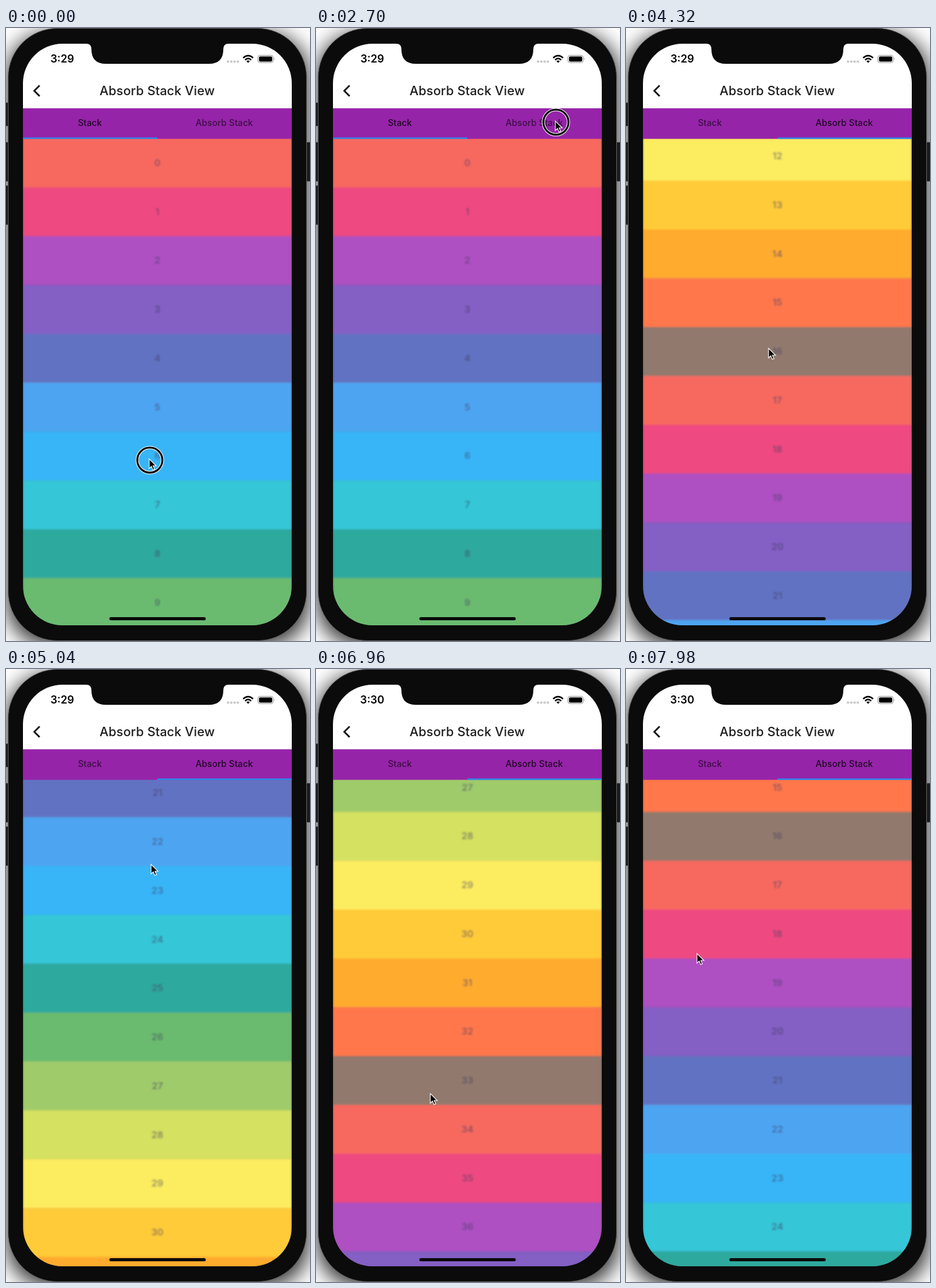
Write an HTML page that moves like this. It is 484 px wide and 976 px high and loops after 8 s.

```html
<!DOCTYPE html>
<html lang="en">
<head>
<meta charset="utf-8">
<title>Absorb Stack View</title>
<style>
  html, body { margin: 0; width: 100%; height: 100%; overflow: hidden; background: #fff; }
  svg { display: block; width: 100vw; height: 100vh; }
  text { font-family: Inter, Roboto, sans-serif; text-anchor: middle; }
</style>
</head>
<body>
<svg id="stage" viewBox="0 0 484 976" preserveAspectRatio="none">
  <defs>
    <filter id="soft" filterUnits="userSpaceOnUse" x="-480" y="80" width="1440" height="970">
      <feGaussianBlur stdDeviation="1.7"/>
    </filter>
    <filter id="shade" x="-20%" y="-10%" width="140%" height="120%">
      <feGaussianBlur stdDeviation="16"/>
    </filter>
    <clipPath id="screen"><rect x="27" y="25" width="428" height="926" rx="63"/></clipPath>
    <clipPath id="list"><rect x="27" y="176" width="428" height="775"/></clipPath>
  </defs>

  <rect width="484" height="976" fill="#fff"/>
  <rect x="1" y="8" width="482" height="976" rx="70" opacity=".8" filter="url(#shade)"/>
  <g fill="#1b1b1b" stroke="#444" stroke-width=".6">
    <rect x="-2" y="119" width="7" height="37" rx="2"/>
    <rect x="-2" y="182" width="7" height="62" rx="2"/>
    <rect x="-2" y="251" width="7" height="62" rx="2"/>
    <rect x="478" y="182" width="8" height="62" rx="2"/>
  </g>
  <rect x="3.5" y=".5" width="475" height="975" rx="78" fill="#0b0b0b" stroke="#606060"/>

  <g clip-path="url(#screen)">
    <rect x="27" y="25" width="428" height="151" fill="#fff"/>
    <rect x="27" y="176" width="428" height="775" fill="#555"/>
    <g clip-path="url(#list)">
      <g filter="url(#soft)"><g id="pageA"/><g id="pageB"/></g>
    </g>
    <rect x="27" y="127.8" width="428" height="48.7" fill="#9624a9"/>
    <rect id="bar" y="174.4" width="214" height="2.1" fill="#2196f3"/>
    <g font-size="14" font-weight="500" letter-spacing=".1">
      <text id="tabA" x="133.5" y="155.5">Stack</text>
      <text id="tabB" x="347.5" y="155.5">Absorb Stack</text>
    </g>
    <text x="240.7" y="107" font-size="20" font-weight="500" letter-spacing=".1" fill="#1c1c1c">Absorb Stack View</text>
    <path d="M53.5 91.5L45 100L53.5 108.5" fill="none" stroke="#111" stroke-width="2.7"/>
    <text id="clock" x="89.5" y="55" font-size="17" font-weight="600">3:29</text>
    <g fill="#c9c9c9">
      <circle cx="353.5" cy="53.5" r="2"/><circle cx="358.7" cy="53.5" r="2"/>
      <circle cx="363.9" cy="53.5" r="2"/><circle cx="369.1" cy="53.5" r="2"/>
    </g>
    <g fill="none" stroke="#000" stroke-width="2.4">
      <path d="M377.6 47.6Q385.5 40.6 393.4 47.6"/>
      <path d="M380.6 50.8Q385.5 46.4 390.4 50.8"/>
    </g>
    <path d="M382.8 52.7Q385.5 50.6 388.2 52.7L385.5 55.6Z"/>
    <rect x="401" y="43.5" width="24.5" height="11.6" rx="3.4" fill="none" stroke="#8f8f8f"/>
    <rect x="402.8" y="45.2" width="21" height="8.2" rx="2"/>
    <path d="M427 47.5Q428.8 49.3 427 51.2Z" fill="#8f8f8f"/>
    <path d="M128 24V25Q136 25 136 34Q136 57 159 57H323Q346 57 346 34Q346 25 354 25V24Z" fill="#0b0b0b"/>
    <rect x="164.5" y="938" width="153.5" height="5" rx="2.5" fill="#0a0a0a"/>
  </g>

  <g id="cursor">
    <g id="ring" fill="none">
      <circle cx="1" cy="2" r="20" stroke="#fff" stroke-width="5"/>
      <circle cx="1" cy="2" r="20" stroke="#000" stroke-width="3"/>
    </g>
    <path d="M0 0V15.2L3.5 12L6 17.6L8.6 16.5L6.1 11H11Z" stroke="#fff" stroke-width="1.1"/>
  </g>
</svg>
<script>
const LOOP = 8000, STEP = 60;
const TOP = 176, ROW = 77.75, PAGE = 428, ROWS = 12;
const COLORS = ['#f7695f', '#ee4a80', '#ae50c2', '#845ec4', '#6272c2', '#4da5f2',
  '#37b5f7', '#36c6d8', '#2fa99e', '#6bbb6f', '#a0cb6a', '#d5e161',
  '#fcec60', '#ffcb38', '#ffab2f', '#ff774b', '#92796d'];

// time, x, y, optional power for an accelerating swipe
const PATH = [
  [0, 228, 686], [360, 245, 360], [420, 245, 360], [780, 260, 671], [840, 260, 671],
  [1680, 287, 338], [1860, 289, 336], [2000, 289, 336], [2600, 381, 148], [2800, 381, 148],
  [3262, 228, 690], [3700, 228, 330, 2], [4020, 227, 330], [4620, 227, 690], [4660, 228, 690],
  [4960, 231, 310, 2], [5040, 231, 311], [5460, 227, 310], [5780, 180, 312], [6060, 180, 312],
  [6900, 182, 676, 5.5], [6960, 182, 676], [7980, 113, 453]
];
const PRESSES = [[0, 360], [900, 1860], [2640, 2745], [3200, 3700], [4620, 4960], [5820, 6900]];

const $ = id => document.getElementById(id);
const clamp = u => Math.max(0, Math.min(1, u));
const lerp = (a, b, u) => a + (b - a) * u;

function add(parent, tag, attrs) {
  const el = document.createElementNS('http://www.w3.org/2000/svg', tag);
  for (const k in attrs) el.setAttribute(k, attrs[k]);
  return parent.appendChild(el);
}

function makePage(group) {
  const rows = Array.from({ length: ROWS }, () => ({
    band: add(group, 'rect', { x: 27, width: PAGE, height: ROW + 0.3 })
  }));
  for (const row of rows) {
    row.label = add(group, 'text', {
      x: 241, 'font-size': 15, 'font-weight': 600, fill: '#3c3c60', 'fill-opacity': 0.6
    });
  }
  return { group, rows };
}

function drawPage(page, shift, scroll) {
  page.group.setAttribute('transform', `translate(${shift} 0)`);
  page.group.setAttribute('display', Math.abs(shift) < PAGE ? 'inline' : 'none');
  const first = Math.floor(scroll / ROW) - 1;
  page.rows.forEach(({ band, label }, k) => {
    const i = first + k, y = TOP + i * ROW - scroll;
    // the row above the first repeats its colour so the top edge stays even
    band.setAttribute('fill', COLORS[Math.max(i, 0) % COLORS.length]);
    band.setAttribute('y', y);
    label.setAttribute('y', y + 43.9);
    label.textContent = i < 0 ? '' : i;
  });
}

function cursorAt(t) {
  const n = Math.max(1, PATH.findIndex(p => p[0] >= t));
  const [t0, x0, y0] = PATH[n - 1], [t1, x1, y1, power] = PATH[n];
  const u = clamp((t - t0) / (t1 - t0));
  const e = power ? u ** power : u * u * (3 - 2 * u);
  return [lerp(x0, x1, e), lerp(y0, y1, e)];
}

const fling = (t, start, from, speed) =>
  from + speed / 2 * (1 - Math.exp(-(t - start) / 500));

function scrollAt(t) {
  const y = cursorAt(t)[1];
  if (t < 3262) return 0;
  if (t < 3700) return 690 - y;
  if (t < 4660) return fling(Math.min(t, 4640), 3700, 360, 1643);
  if (t < 4960) return 1056 + 690 - y;
  if (t < 6060) return fling(Math.min(t, 5820), 4960, 1436, 2900);
  if (t < 6900) return 2626.2 + 312 - y;
  return fling(t, 6900, 2262.2, -2418.4);
}

const pageA = makePage($('pageA')), pageB = makePage($('pageB'));

function draw(t) {
  const slide = 1 - (1 - clamp((t - 2745) / 300)) ** 2;
  drawPage(pageA, -slide * PAGE, 0);
  drawPage(pageB, (1 - slide) * PAGE, scrollAt(t));
  $('bar').setAttribute('x', 27 + slide * PAGE / 2);
  $('tabA').setAttribute('fill-opacity', lerp(0.8, 0.6, slide));
  $('tabB').setAttribute('fill-opacity', lerp(0.6, 0.8, slide));
  $('clock').textContent = t < 5760 ? '3:29' : '3:30';
  $('cursor').setAttribute('transform', `translate(${cursorAt(t)})`);
  const down = PRESSES.some(([a, b]) => t >= a && t < b);
  $('ring').setAttribute('visibility', down ? 'visible' : 'hidden');
}

const start = performance.now();
function tick() {
  const t = (performance.now() - start) % LOOP;
  draw(Math.floor(t / STEP) * STEP);
  requestAnimationFrame(tick);
}
tick();
</script>
</body>
</html>
```
